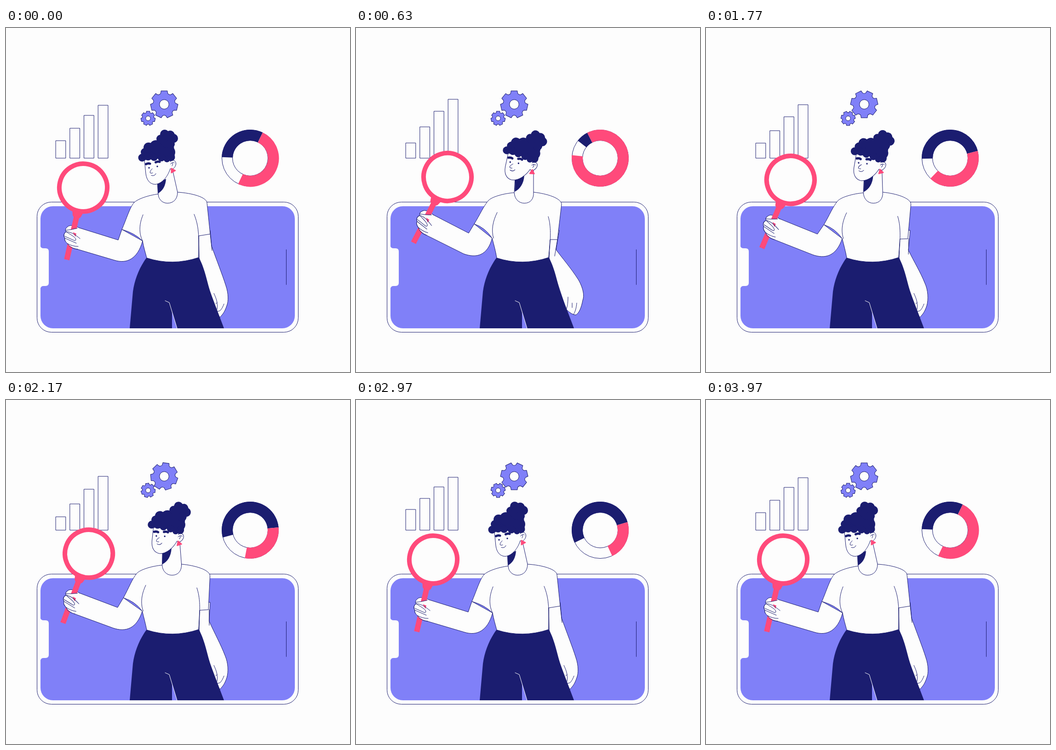
An HTML page for the animation above (4010 ms loop, 748 px wide and 748 px high).

```html
<!DOCTYPE html>
<html lang="en">
<head>
<meta charset="utf-8">
<title>Data research</title>
<style>
  html, body { margin: 0; width: 100%; height: 100%; overflow: hidden; background: #fdfdfd; }
  svg { display: block; width: 100vw; height: 100vh; }
  .line { fill: none; stroke: #1b1d70; stroke-width: 1; stroke-linejoin: round; stroke-linecap: round; }
  .skin { fill: #fdfdfd; stroke: #1b1d70; stroke-width: 1; stroke-linejoin: round; }
  .navy { fill: #1b1d70; }
  .pink { fill: #ff4a7b; }
  .violet { fill: #8080f8; }
</style>
</head>
<body>
<svg viewBox="0 0 748 748">
  <!-- phone -->
  <rect class="skin" x="67.5" y="378.5" width="568" height="283" rx="31"/>
  <rect class="violet" x="75" y="387.5" width="553" height="265.5" rx="27"/>
  <path class="skin" style="stroke:none" d="M74 471 Q75 479 81 479 H86 Q93 479 93 486 V554 Q93 561 86 561 H81 Q75 561 74 570 Z"/>
  <path class="line" d="M609.5 482 V558"/>

  <g id="bars" class="line"></g>

  <g id="gears"></g>

  <!-- ring chart -->
  <circle class="skin" cx="531" cy="283" r="61.5"/>
  <circle class="skin" cx="531" cy="283" r="38.5"/>
  <path id="ringNavy" fill="none" stroke="#1b1d70" stroke-width="24"/>
  <path id="ringPink" fill="none" stroke="#ff4a7b" stroke-width="24"/>

  <!-- hanging arm -->
  <path id="farArm" class="skin"/>
  <path id="farCrease" class="line"/>
  <path id="farFingers" class="line"/>

  <!-- trousers -->
  <path class="navy" d="M306 499 H419 C430 517 436 545 443 571 L474 653 H372 L361 616 V653 H269 L276 573 C280 545 291 519 306 499 Z"/>
  <path class="line" style="stroke:#fdfdfd" d="M346 593 L355 597 L372 653"/>

  <path id="nearArm" class="skin"/>
  <path id="shirt" class="skin"/>
  <path id="folds" class="line"/>
  <path id="neck" class="skin"/>
  <path id="shade" class="navy"/>

  <g id="head">
    <path class="skin" d="M301 287 L304 317 C306 332 314 340 325 340 C340 338 353 322 358 303 L357 280 Z"/>
    <path class="skin" d="M357 291 C361 285 370 287 369.500 296 C368 304 362 309 357 306"/>
    <path class="line" d="M358 296 Q361 291 366 293 M361 293 Q364 296 361 300"/>
    <path id="earring" class="pink" stroke="#ff4a7b" stroke-width="2" stroke-linejoin="round" d="M359.500 305 L368.500 310 L359.500 315 Z"/>
    <path class="line" style="stroke-width:5" d="M304.500 296 Q309 293.500 313 295 M325.500 292 Q330 289.500 334 291"/>
    <circle class="navy" cx="311" cy="304" r="1.7"/>
    <circle class="navy" cx="329" cy="301" r="1.7"/>
    <path class="line" d="M318 306 Q312 312 313.500 315 Q316 317 319 315 M316 320.500 Q323 323 326 316.500"/>
    <path class="navy" d="M298 276 L309 256 L330 247 L345 238 L364 244 L367 281 L340 284 L300 285 Z"/>
    <g id="curls" class="navy"></g>
  </g>

  <g id="hand">
    <path class="skin" d="M160 435 C150 430 140 427 134 432 C128 437 129 440 131 443 C125 446 125 453 128 457 C127 463 131 466 134 469 C138 476 146 480 156 481"/>
    <g transform="translate(168 347) rotate(12.9)">
      <path class="pink" d="M-12 54 H12 L9 64 L6 67 V161 H-6 V67 L-9 64 Z"/>
      <circle r="52" fill="#fdfdfd" stroke="#ff4a7b" stroke-width="10"/>
    </g>
    <path class="skin" style="stroke:none" d="M131 441 L157 435 L160 480 L153 480 Q138 476 134 469 Q127 463 128 457 Q125 450 131 443 Z"/>
    <path class="pink" d="M145 444 L153 447 L151 454 Z"/>
    <path class="line" d="M129 440 Q140 439 155 435.500 M131 443 C141 443 150 449 161 458 M131 443 C125 446 125 453 128 457 C127 463 131 466 134 469 C138 476 146 480 155 481 M131 443 C139 449 151 454 152 460 Q151 464 146 461 L128 453 M128 457 L153 468 M134 469 Q145 475 157 475"/>
  </g>
</svg>

<script>
const LOOP = 4010;
const $ = id => document.getElementById(id);
const set = (id, d) => $(id).setAttribute('d', d);
const move = (id, value) => $(id).setAttribute('transform', value);

function add(parent, tag, attrs) {
  const node = document.createElementNS('http://www.w3.org/2000/svg', tag);
  for (const key in attrs) node.setAttribute(key, attrs[key]);
  return $(parent).appendChild(node);
}

// Smooth curve through [time, value] keys that never overshoots them.
function track(...keys) {
  const rise = keys.slice(1).map((k, i) => (k[1] - keys[i][1]) / (k[0] - keys[i][0]));
  const slope = keys.map((k, i) => {
    const a = rise[i - 1], b = rise[i];
    return a * b > 0 ? 2 * a * b / (a + b) : 0;
  });
  return t => {
    let i = 0;
    while (i < rise.length - 1 && t >= keys[i + 1][0]) i++;
    const [t0, v0] = keys[i], [t1, v1] = keys[i + 1];
    const h = t1 - t0, u = (t - t0) / h, w = 1 - u;
    return v0 * w * w * (1 + 2 * u) + v1 * u * u * (3 - 2 * u)
      + h * u * w * (slope[i] * w - slope[i + 1] * u);
  };
}

const BEATS = [0, 630, 1270, 2170, 2470, 2970, 3970, LOOP];
const onBeats = (...values) => track(...values.map((v, i) => [BEATS[i], v]));

// Blends two paths of the same structure.
function mix(from, to, k) {
  const ends = to.match(/-?[\d.]+/g);
  let i = 0;
  return from.replace(/-?[\d.]+/g, n => (+n + (ends[i++] - n) * k).toFixed(2));
}

const lean = track([0, 0], [100, 0], [340, .62], [590, 1.01], [630, 1], [1000, .87],
  [1270, .87], [2020, .85], [2170, .66], [2300, .2], [2470, -.15], [2970, 0], [LOOP, 0]);
const swing = track([0, 0], [200, 0], [600, 1], [650, 1], [1150, 0], [2380, 0],
  [2470, -.15], [2580, -.5], [2940, 0], [LOOP, 0]);

const barTops = [
  onBeats(245, 250, 245, 254, 245, 238, 245, 245),
  onBeats(218, 215, 218, 226, 218, 214, 218, 218),
  onBeats(190, 181, 190, 194, 192, 189, 190, 190),
  onBeats(168, 155, 168, 166, 173, 168, 169, 168)
];
const bars = barTops.map((top, i) => add('bars', 'rect', { x: 108.5 + 30.7 * i, width: 21.3 }));

const navyStart = onBeats(272, 308, 284, 255, 235.5, 244, 272, 272);
const navyEnd = onBeats(386, 333, 408, 444.5, 444.5, 433.6, 386, 386);
const pinkEnd = track([0, 565], [630, 636], [1270, 613], [2170, 551], [2470, 501],
  [2970, 515], [3770, 565], [LOOP, 565]);
const gearTeeth = onBeats(0, -1, -2, -2.85, -3.1, -3.5, -4, -4);

const TEETH = 7;
function gear(x, y, r, hole) {
  const point = (deg, k) => {
    const a = deg * Math.PI / 180;
    return `${(r * k * Math.sin(a)).toFixed(2)} ${(-r * k * Math.cos(a)).toFixed(2)}`;
  };
  let d = '';
  for (let i = 0; i < TEETH; i++) {
    const a = i * 360 / TEETH;
    d += `${i ? 'L' : 'M'}${point(a - 13, 1)} L${point(a + 13, 1)} L${point(a + 18, .83)} Q${point(a + 25.7, .76)} ${point(a + 33.4, .83)}`;
  }
  const node = add('gears', 'path', { class: 'violet', stroke: '#1b1d70', d: d + 'Z' });
  add('gears', 'circle', { class: 'skin', cx: x, cy: y, r: hole });
  return turns => node.setAttribute('transform', `translate(${x} ${y}) rotate(${turns * 360 / TEETH})`);
}
const bigGear = gear(344, 166, 30, 10.3);
const smallGear = gear(309, 196.5, 15.8, 5.2);

for (const [cx, cy, r] of [
  [296, 282, 8.5], [302, 270, 9], [310, 260, 11], [326, 258, 14], [343, 258, 17],
  [355, 270, 13], [359, 281, 8.5], [350, 285, 7], [338, 282, 8], [322, 281, 8], [309, 280, 8],
  [345, 231, 10], [357, 233, 10], [364, 240, 10], [336, 241, 9], [350, 246, 14], [357, 252, 10]
]) add('curls', 'circle', { cx, cy, r });

const SHIRT = [
  'M331 361 C308 364 286 372 278 380 C269 391 262 415 252 438 Q280 446 297 463 C299 476 303 488 306 500 Q362 518 419 499 L419 452 L444 448 L437 380 C436 368 405 359 373 357 Z',
  'M344 358 C320 360 296 367 288 375 C278 386 269 407 257 426 Q281 434 296 457 C300 472 304 487 306 500 Q362 518 419 499 L422 460 L438 460 L447 383 C446 370 415 360 386 357 Z'
];
const FOLDS = [
  'M298 406 C290 425 288 445 297 463 M409 405 C419 430 420 450 419 499',
  'M307 401 C297 421 294 440 299 457 M418 410 C424 430 424 455 419 499'
];
const NECK = [
  'M329 330 L331 361 C331 372 340 381 351 381 C364 381 373 372 373 357 L362 308',
  'M346 325 L344 358 C345 372 354 381 366 381 C379 381 387 372 386 357 L386 308'
];
const SHADE = [
  'M329 336 L330 360 C341 354 347 343 348 328 Z',
  'M346 328 L345 356 C357 350 365 338 366 320 Z'
];
// Far arm: at rest, leaning, swung out.
const FAR_ARM = [
  'M419 440 L444 440 L447 474 C458 505 470 535 478 560 C484 578 484 594 480 604 C476 616 472 622 465 629 Q461 624 456 612 L420 500 Z',
  'M421 440 L444 440 L440 483 C452 508 466 530 476 555 C483 570 484 590 480 604 C476 616 472 622 465 629 Q461 624 456 612 L420 500 Z',
  'M422 440 L442 440 L435 482 C448 500 466 520 484 548 C494 566 497 582 493 592 C490 608 485 620 478 624 Q470 624 457 612 L420 500 Z'
];
const FAR_CREASE = ['M444 448 L448 484', 'M441 458 L440 492', 'M438 460 L432 496'];
const FAR_FINGERS = [
  'M452 577 C457 588 461 597 459 612 M474 600 C470 610 466 617 460 616 M459 597 L456 600',
  'M461 585 C461 600 459 607 457 613 M480 598 C479 609 477 616 473 623 M470 598 C470 608 468 616 465 622'
];

function arc(from, to) {
  const point = deg => {
    const a = deg * Math.PI / 180;
    return `${(531 + 50 * Math.sin(a)).toFixed(2)} ${(283 - 50 * Math.cos(a)).toFixed(2)}`;
  };
  return `M${point(from)} A50 50 0 ${to - from > 180 ? 1 : 0} 1 ${point(to)}`;
}

function drawCharts(t) {
  bars.forEach((bar, i) => {
    const top = barTops[i](t);
    bar.setAttribute('y', top);
    bar.setAttribute('height', 283 - top);
  });
  const split = navyEnd(t);
  set('ringNavy', arc(navyStart(t), split));
  set('ringPink', arc(split, pinkEnd(t)));
  const turn = gearTeeth(t);
  bigGear(turn);
  smallGear(-turn);
}

function drawWoman(p, r) {
  for (const [id, pair] of Object.entries({ shirt: SHIRT, folds: FOLDS, neck: NECK, shade: SHADE }))
    set(id, mix(...pair, p));
  move('head', `translate(${22 * p} ${-10 * p}) rotate(${18 * p} 320 310)`);
  move('earring', `rotate(${-105 * r} 363 310)`);

  const far = ([rest, leaning, out]) => mix(mix(rest, leaning, p / .87), out, r);
  set('farArm', far(FAR_ARM));
  set('farCrease', far(FAR_CREASE));
  set('farFingers', mix(...FAR_FINGERS, r));

  // The hand and lens move as one piece; the wrist follows them.
  const dx = 18.4 * p + 12.6 * r, dy = -19.5 * p - 3.5 * r, turn = 11.5 * p + 3 * r;
  move('hand', `translate(${dx} ${dy}) rotate(${turn} 168 347)`);
  const c = Math.cos(turn * Math.PI / 180), s = Math.sin(turn * Math.PI / 180);
  const wrist = (x, y) =>
    `${168 + dx + (x - 168) * c - (y - 347) * s} ${347 + dy + (x - 168) * s + (y - 347) * c}`;
  const pull = 3 * (r - p);
  const elbow = `${236 + pull - 2 * p} ${505 - 14 * p}`;
  set('nearArm', `M${wrist(155, 481)} L${elbow} `
    + `C${262 + pull} ${513 - 12 * p} ${286 + pull} ${503 - 8 * p} ${297 - p} ${463 - 6 * p} `
    + `L${252 + 5 * p} ${438 - 12 * p} L${244 + pull + p} ${461 - 15 * p} `
    + `L${wrist(159, 434.5)}`);
}

function frame(now) {
  const t = now % LOOP;
  drawCharts(t);
  drawWoman(lean(t), swing(t));
  requestAnimationFrame(frame);
}

const start = performance.now();
drawCharts(0);
drawWoman(0, 0);
requestAnimationFrame(function tick() {
  const t = Math.max(0, performance.now() - start) % LOOP;
  drawCharts(t);
  drawWoman(lean(t), swing(t));
  requestAnimationFrame(tick);
});
</script>
</body>
</html>
```
